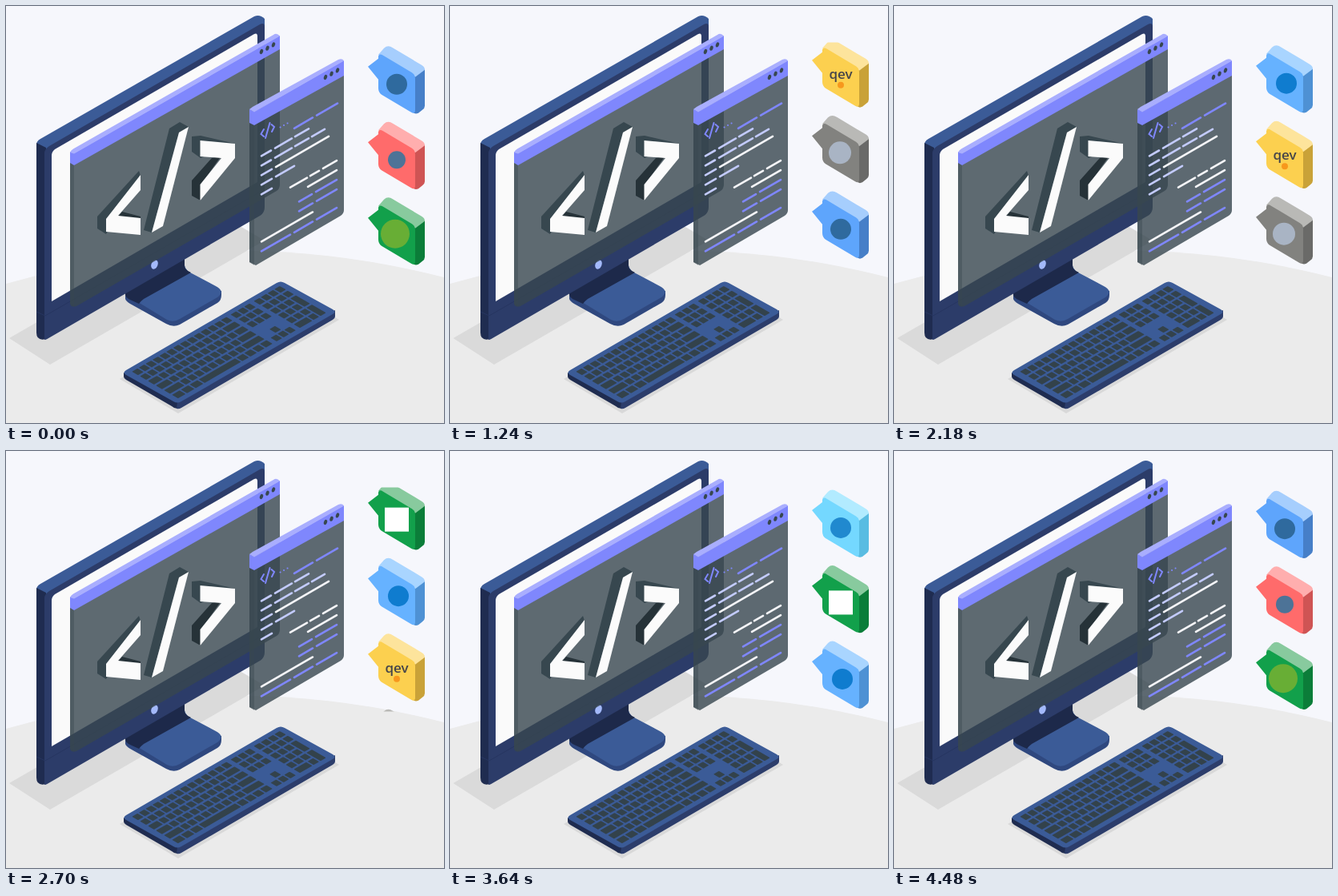
Write an HTML page that moves like this. It is 547 by 521 pixels and loops after 4.51 s.

```html
<!DOCTYPE html>
<html lang="en">
<head>
<meta charset="utf-8">
<title>Isometric coding desk</title>
<style>
  html, body { margin: 0; width: 100%; height: 100%; overflow: hidden; background: #f6f7fc; }
  svg { display: block; width: 547px; height: 521px; }
  text { font: 600 17px "Open Sans", sans-serif; fill: #45454a; }
</style>
</head>
<body>
<svg viewBox="0 0 547 521">
  <defs>
    <clipPath id="window"><rect x="440" y="45.5" width="107" height="280"/></clipPath>
  </defs>

  <path fill="#ebebeb" d="M0 347Q273.5 268.5 547 339V521H0z"/>
  <path fill="#dadada" d="M4 415L55 448L323 293L270 262z"/>

  <g id="stand">
    <path fill="#2f487f" d="M149 358V366Q150 369 155 372L200 397Q209 402 217 398L264 371Q269 368 269 361V356L220 340z"/>
    <path fill="#3b5b97" d="M152 362L222 318Q222 329 230 333L262 350Q274 356 264 364L217 391Q209 396 201 392z"/>
    <path fill="#1d294a" d="M149 358L223 312V324Q223 330 231 333L172 366Q168 369 166 372L155 367Q149 364 149 360z"/>
  </g>

  <g id="monitor">
    <path fill="#3b5b97" d="M38 173Q38 169 43 166L310 13Q317 10 323 16V26L50 186z"/>
    <path fill="#1f2c50" d="M38 171L50 177V416Q38 419 38 408z"/>
    <path fill="#2c3c69" d="M48 183Q49 178 54 175L317 23Q323 20 323 26V251Q323 258 318 261.500L54 414.500Q49 418 48 416.500z"/>
    <path fill="#fafafa" d="M57 187Q57 182 61 179L310 35Q314 33 314 38V220L57 369z"/>
    <path fill="none" stroke="#263560" d="M38 382L49 387L323 229"/>
    <ellipse cx="185.500" cy="323" rx="4" ry="6" fill="#a3b9fb" transform="rotate(22 185.500 323)"/>
  </g>

  <g id="big-panel">
    <path fill="#37474f" fill-opacity=".8" d="M80 190L85 196L342 50V223Q342 228 338 231L88 375Q80 377 80 371z"/>
    <path fill="#37474f" fill-opacity=".4" d="M80 192L85 196V376L80 372z"/>
    <path fill="#7f87fd" d="M80 182L85 184L342 37V54L85 199L80 196z"/>
    <path fill="#a9aefe" d="M80 183Q81 180 84 178.500L334 36Q338 33 342 37.500L85 184.500z"/>
  </g>

  <g id="big-code">
    <path fill="#37474f" d="M114 263L166 206L168 212L125 285L114 278z"/>
    <path fill="#263238" d="M138 265L145 257L168 263V268z"/>
    <path fill="#fbfbfb" d="M125 266L168 211V230L140 262L168 265V286L125 282z"/>
    <path fill="#37474f" d="M172 280L204 153L217 145L228 151L216 160L182 283z"/>
    <path fill="#fbfbfb" d="M182 283L216 158L228 151L196 275z"/>
    <path fill="#37474f" d="M232 163L243 162L286 172L243 190L232 182z"/>
    <path fill="#263238" d="M232 218L257 190L269 187L243 224V243L232 237z"/>
    <path fill="#fbfbfb" d="M242.500 168L286 172V190L242.500 243V223L269 190L242.500 188z"/>
  </g>

  <g id="small-panel">
    <path fill="#37474f" fill-opacity=".8" d="M304 142L310 148L422 84V255Q422 259 418 262L312 324L304 320z"/>
    <path fill="#37474f" fill-opacity=".4" d="M304 142L310 148V324L304 320z"/>
    <path fill="#7f87fd" d="M304 129L310 132L422 68V87L310 149L304 146z"/>
    <path fill="#a9aefe" d="M304 129L308 126L415 67Q420 65 422 68.500L310 132.500z"/>
  </g>
  <g id="dots" fill="#37474f"></g>
  <g id="code-lines" fill="none" stroke-width="2.600" stroke-linecap="round">
    <path stroke="#7f87fd" stroke-width="2" d="M322 154L318.500 160L322 163M329.500 146L324 165M331.500 148L335 151L332 157M342.500 151.500h.1M347 149h.1M351.500 146.500h.1"/>
  </g>

  <g id="keyboard">
    <path fill="#d9d9d9" d="M142 466L345 350L416 392L215 509z"/>
    <path fill="#1f2c50" d="M147 458L214 495V503Q210 503 207 500L150 467Q147 465 147 463z"/>
    <path fill="#2c3d6b" d="M214 494L411 380V388Q411 390 408 392L219 502Q216 504 213 503z"/>
    <path fill="#3b5b97" d="M150 455L338 346Q343 343 348 346L408 379Q413 382 408 385L219 494Q214 497 209 494L150 461Q145 458 150 455z"/>
    <g id="keys" fill="#33424b" transform="matrix(8.550 -4.950 10 5.800 149 457)"></g>
  </g>

  <g clip-path="url(#window)"><g id="strip"></g></g>
</svg>

<script>
const LOOP = 4510, LEAD = 12, STEP = 94.5, SLOPE = -0.577;
const byId = id => document.getElementById(id);
const add = (id, markup) => byId(id).insertAdjacentHTML("beforeend", markup);

// Title bar buttons
for (const [x, y] of [[319, 57], [399, 89]])
  for (let i = 0; i < 3; i++)
    add("dots", `<ellipse cx="${x + 7.5 * i}" cy="${y - 4.3 * i}" rx="2" ry="3.200" transform="rotate(20 ${x + 7.5 * i} ${y - 4.3 * i})"/>`);

// Code rows: colour, height at x = 318, then start and end of each dash
const PURPLE = "#7f87fd", PALE = "#c3cbfd", WHITE = "#f5f5f8";
const rows = [
  [PURPLE, 177, 360, 383, 388, 414],
  [PALE, 188, 319, 331, 336, 357, 361, 378],
  [PALE, 200, 319, 331, 336, 357, 361, 378, 382, 398],
  [PALE, 212, 319, 332], [WHITE, 212, 337, 403],
  [PALE, 224, 319, 332, 337, 360],
  [PALE, 236, 319, 332],
  [WHITE, 248, 355, 376, 380, 391, 396, 413],
  [WHITE, 260, 377, 413],
  [PURPLE, 272, 366, 382, 387, 413],
  [PURPLE, 284, 366, 383, 388, 413],
  [WHITE, 295, 319, 383],
  [PURPLE, 307, 319, 355, 360, 383, 388, 413]
];
for (const [color, base, ...ends] of rows) {
  const point = x => `${x} ${base + SLOPE * (x - 318)}`;
  let d = "";
  for (let i = 0; i < ends.length; i += 2) d += `M${point(ends[i])}L${point(ends[i + 1])}`;
  add("code-lines", `<path stroke="${color}" d="${d}"/>`);
}

// Keyboard, measured in key units
const key = (x, row, w = 1, h = 1) =>
  add("keys", `<rect x="${x}" y="${row + 0.4}" width="${w - 0.2}" height="${h - 0.24}" rx=".08"/>`);
const mainRows = [[1, 12], [1, 11], [1.5, 11], [1.8, 10], [2.3, 9]];
mainRows.forEach(([first, count], row) => {
  key(0.5, row, first);
  for (let i = 0; i < count; i++) key(0.5 + first + i, row);
  key(0.5 + first + count, row, 14 - first - count);
});
let left = 0.5;
for (const w of [1.3, 1.3, 1.3, 5.5, 1.15, 1.15, 1.15, 1.15]) { key(left, 5, w); left += w; }
for (let i = 0; i < 3; i++) {
  for (const row of [0, 1, 2, 5]) key(14.9 + i, row);
  for (let row = 1; row < 5; row++) key(18.3 + i, row);
}
key(15.9, 4);
for (let i = 0; i < 4; i++) key(18.3 + i, 0);
key(18.3, 5, 2);
key(20.3, 5);
key(21.3, 1);
key(21.3, 2, 1, 2);
key(21.3, 4, 1, 2);

// Tiles from top to bottom: front, top and side colours, then the badge
const disc = (color, r, x = 488, y = 47) => `<circle cx="${x}" cy="${y}" r="${r}" fill="${color}"/>`;
const GREEN = ["#12a04b", "#88ca9e", "#0b7d39"];
const tiles = [
  ["#74d8ff", "#b2ebff", "#59bce2", disc("#2089cf", 13)],
  [...GREEN, '<rect x="473" y="31" width="30" height="30" fill="#fff"/>'],
  ["#66b2ff", "#a9d5ff", "#4e91d4", disc("#0f7ccf", 13, 490)],
  ["#fcd04f", "#fde49c", "#c9a238", '<text x="488" y="48" text-anchor="middle">qev</text>' + disc("#f7981d", 4, 488, 56)],
  ["#82827f", "#b9b9b6", "#6a6a68", disc("#a9b4c4", 14, 487, 46)],
  ["#5ea5fc", "#a6cefd", "#467fc8", disc("#2f6a9e", 13)],
  ["#ff6b6b", "#ffaeae", "#cf5454", disc("#4d7397", 11)],
  [...GREEN, disc("#68ae35", 18, 486, 45)]
];
tiles.forEach(([front, top, side, badge], i) => add("strip", `
  <g transform="translate(0 ${50 + STEP * i})">
    <path fill="${side}" d="M509 38L523 28V74Q523 77 520 79L515 83Q511 85 508 82z"/>
    <path fill="${top}" d="M465 10L472 2Q477 -2.500 483 1.500L519 23Q523 25 523 29L511 38z"/>
    <path fill="${front}" d="M452 25L465 15V12Q466 8 471 11L507 32.500Q511 35 511 40V79Q511 85 506 82L469 60Q465 57 465 52V41z"/>
    ${badge}
  </g>`));

// The standard CSS "ease" curve
function ease(x) {
  let lo = 0, hi = 1, s = 0.5;
  for (let i = 0; i < 24; i++) {
    if (0.75 * s * (1 - s) + s ** 3 < x) lo = s; else hi = s;
    s = (lo + hi) / 2;
  }
  return 0.3 * s * (1 - s) ** 2 + 3 * s * s * (1 - s) + s ** 3;
}

// Five steps down, then one sweep back
function draw(now) {
  const phase = (now + LEAD) % LOOP / LOOP * 6;
  const step = Math.floor(phase), eased = ease(phase - step);
  const shift = step < 5 ? step + eased : 5 - 5 * eased;
  byId("strip").setAttribute("transform", `translate(0 ${STEP * (shift - 5)})`);
}

let start;
function tick(now) {
  start ??= now;
  draw(now - start);
  requestAnimationFrame(tick);
}
draw(0);
requestAnimationFrame(tick);
</script>
</body>
</html>
```
